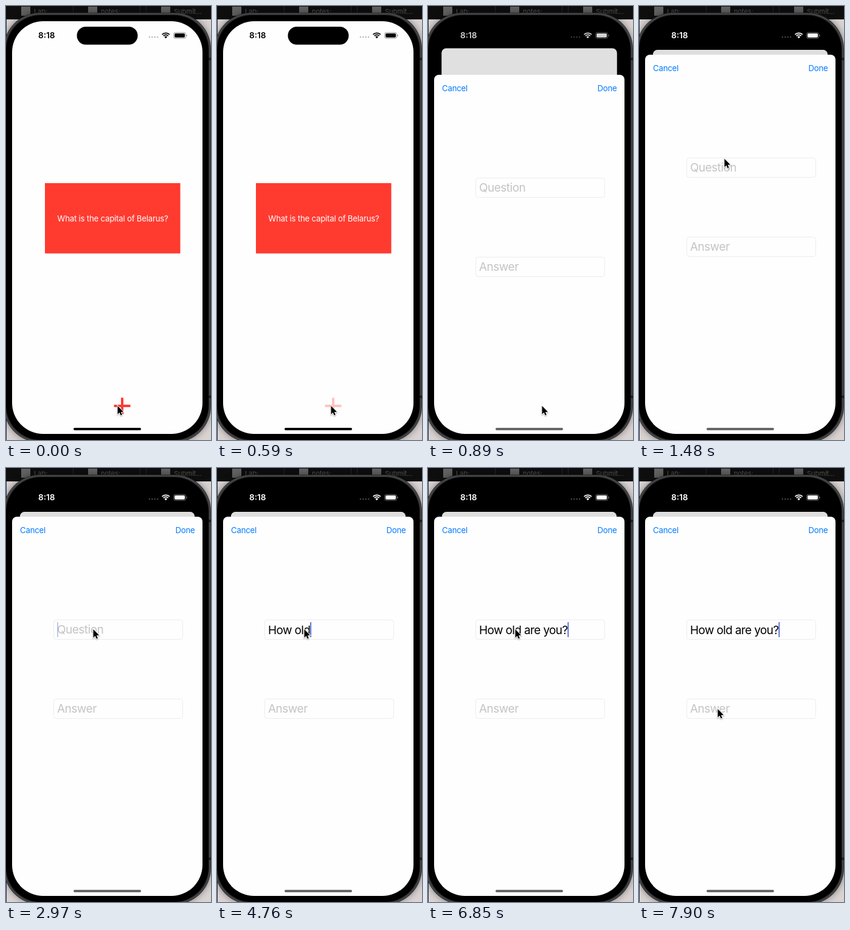
An HTML page with a canvas for the animation above (8000 ms loop, 337x713 px).

```html
<!DOCTYPE html>
<html lang="en">
<head>
<meta charset="utf-8">
<title>Flashcard app</title>
<style>
  html, body { margin: 0; width: 100%; height: 100%; overflow: hidden; background: #000; }
  canvas { display: block; }
</style>
</head>
<body>
<canvas id="stage" width="337" height="713"></canvas>
<script>
const ctx = document.getElementById('stage').getContext('2d');
const LOOP = 8000, TICK = 149;
const RED = '#ff3b30', BLUE = '#007aff', WHITE = '#fefefe';
const SCREEN_RADIUS = 51;
const QUESTION = 'How old are you?';

// Tick at which each character of QUESTION is typed
const keyTicks = [23, 24, 25, 26, 29, 30, 32, 33, 34, 35, 36, 37, 39, 42, 43, 46];
// Caret opacity while it blinks; solid otherwise
const caretFade = { 20: .4, 21: 0, 50: .4, 51: 0, 52: .4 };
// Pointer stops: tick, x, y
const pointerPath = [
  [0, 184, 657], [1, 188, 657], [7, 186, 610], [8, 172, 470], [9, 150, 330],
  [10, 141, 251], [11, 141, 256], [12, 143, 262], [13, 144, 265],
  [49, 143, 270], [50, 138, 310], [51, 132, 360], [52, 130, 390], [53, 130, 396]
];

const clamp = v => Math.max(0, Math.min(1, v));

function rect(x, y, w, h, color, r = 0) {
  ctx.fillStyle = color;
  ctx.beginPath();
  ctx.roundRect(x, y, w, h, r);
  ctx.fill();
}

function outline(x, y, w, h, color, r) {
  ctx.strokeStyle = color;
  ctx.lineWidth = 1;
  ctx.beginPath();
  ctx.roundRect(x, y, w, h, r);
  ctx.stroke();
}

function text(str, x, y, size, color, { spacing = -.2, align = 'left', weight = 400 } = {}) {
  ctx.font = `${weight} ${size}px Inter, sans-serif`;
  ctx.letterSpacing = spacing + 'px';
  ctx.textAlign = align;
  ctx.fillStyle = color;
  ctx.fillText(str, x, y);
  return ctx.measureText(str).width;
}

function drawDesktop() {
  rect(0, 0, 337, 713, '#d9d3d2');
  rect(0, 0, 337, 22, '#0e0e0e');
  rect(0, 22, 1, 691, '#1d2c4a');
  for (const x of [110, 220, 230]) rect(x, 0, 1, 12, '#262626');
  [['Lab:', 25], ['notes:', 135], ['Submit...', 255]].forEach(([label, x]) => {
    rect(x, 1, 15, 15, '#626262');
    text(label, x + 21, 12.5, 11, '#525252', { spacing: 0 });
  });
}

function drawBody() {
  ctx.save();
  ctx.shadowColor = 'rgba(0,0,0,.4)';
  ctx.shadowBlur = 12;
  rect(-4, 11, 341, 706, '#2c2c2e', 60);
  ctx.restore();
  rect(-3, 12, 339, 704, '#4a4a4c', 59);
  rect(-1.5, 13.5, 336, 701, '#303032', 58);
  for (const y of [85, 640]) rect(333, y, 4, 4, '#1c1c1e');
  rect(0, 15, 333, 698, '#000', 57);
}

function drawHome(p, tick) {
  const scale = 1 - .083 * p;
  const radius = p ? 8 + (SCREEN_RADIUS - 8) * (1 - p) ** 2 : 0;
  ctx.save();
  ctx.translate(166.5, 25 + 47 * p);
  ctx.scale(scale, scale);
  ctx.translate(-166.5, -25);
  rect(10, 25, 313, 678, WHITE, radius);
  rect(64, 291, 222.5, 115.5, RED);
  text('What is the capital of Belarus?', 175.5, 353.5, 13.2, '#fff', { align: 'center' });
  ctx.globalAlpha = tick < 3 ? 1 : .3;
  ctx.fillStyle = RED;
  ctx.beginPath();
  ctx.rect(177.5, 655, 27, 4);
  ctx.rect(189, 643.5, 4, 27);
  ctx.fill();
  ctx.globalAlpha = 1;
  if (p) rect(10, 25, 313, 678, `rgba(0,0,0,${.125 * p})`, radius);
  ctx.restore();
}

function drawField(y, placeholder) {
  outline(78.5, y + .5, 212, 32, '#ececec', 4);
  if (placeholder) text(placeholder, 84, y + 23.3, 19, '#c4c4c6', { spacing: -.5 });
}

function drawSheet(top, tick) {
  rect(10, top, 313, 720, WHITE, 8);
  text('Cancel', 23, top + 27, 13.2, BLUE);
  text('Done', 310.5, top + 27, 13.2, BLUE, { align: 'right' });

  const typed = QUESTION.slice(0, keyTicks.filter(k => k <= tick).length);
  drawField(top + 169, typed ? '' : 'Question');
  drawField(top + 299, 'Answer');
  const width = text(typed, 84, top + 192.7, 19, '#000', { spacing: -.63 });
  if (tick >= 15) {
    ctx.globalAlpha = caretFade[tick] ?? 1;
    rect(84 + width, top + 173, 1.7, 25, '#3f62d8', .8);
    ctx.globalAlpha = 1;
  }
}

function drawStatus(light) {
  const v = Math.round(255 * light), color = `rgb(${v},${v},${v})`;
  const tint = alpha => `rgba(${v},${v},${v},${alpha})`;
  rect(116.5, 34, 100, 29.5, '#000', 14.7);
  text('8:18', 53, 53, 13.6, color, { spacing: 0, weight: 600 });
  for (let i = 0; i < 4; i++) rect(234.6 + i * 4.4, 49.8, 2.6, 2.6, tint(.26), 1.3);

  // Wi-Fi: two arcs over a wedge
  ctx.strokeStyle = ctx.fillStyle = color;
  ctx.lineWidth = 1.8;
  for (const r of [8.7, 5.6]) {
    ctx.beginPath();
    ctx.arc(262.7, 53, r, -Math.PI * .75, -Math.PI * .25);
    ctx.stroke();
  }
  ctx.beginPath();
  ctx.moveTo(262.7, 53.2);
  ctx.arc(262.7, 53, 3.3, -Math.PI * .75, -Math.PI * .25);
  ctx.fill();

  // Battery
  outline(275.5, 43.5, 20, 9.8, tint(.4), 3);
  rect(277, 45, 17, 6.8, color, 1.8);
  rect(296.5, 46.8, 1.2, 3.2, tint(.4), .6);
}

function drawPointer(tick) {
  const [, x, y] = pointerPath.filter(s => s[0] <= tick).pop();
  ctx.save();
  ctx.translate(x - .5, y);
  ctx.scale(.94, .94);
  ctx.beginPath();
  ctx.moveTo(0, 0);
  for (const [px, py] of [[0, 14.5], [3.3, 11.4], [5.5, 16.4], [7.8, 15.4], [5.7, 10.6], [10.2, 10.4]])
    ctx.lineTo(px, py);
  ctx.closePath();
  ctx.shadowColor = 'rgba(0,0,0,.35)';
  ctx.shadowBlur = 2;
  ctx.shadowOffsetY = 1;
  ctx.strokeStyle = '#fff';
  ctx.lineWidth = 2;
  ctx.stroke();
  ctx.shadowColor = 'transparent';
  ctx.fillStyle = '#000';
  ctx.fill();
  ctx.restore();
}

function draw(now) {
  const tick = Math.floor((now % LOOP + 16) / TICK);
  const time = tick * TICK;
  // Critically damped spring that raises the sheet
  const x = Math.max(0, (time - 611.2) * .0166);
  const p = 1 - (1 + x) * Math.exp(-x);

  drawDesktop();
  drawBody();
  ctx.save();
  ctx.beginPath();
  ctx.roundRect(10, 25, 313, 678, SCREEN_RADIUS);
  ctx.clip();
  rect(10, 25, 313, 678, '#000');
  drawHome(p, tick);
  drawStatus(clamp((time - 691) / 247));
  if (p) drawSheet(713 - 633 * p, tick);
  rect(111, 693, 111, 4, p ? '#676767' : '#000', 2);
  ctx.restore();
  drawPointer(tick);
}

const start = performance.now();
function loop() {
  draw(performance.now() - start);
  requestAnimationFrame(loop);
}
loop();
</script>
</body>
</html>
```
